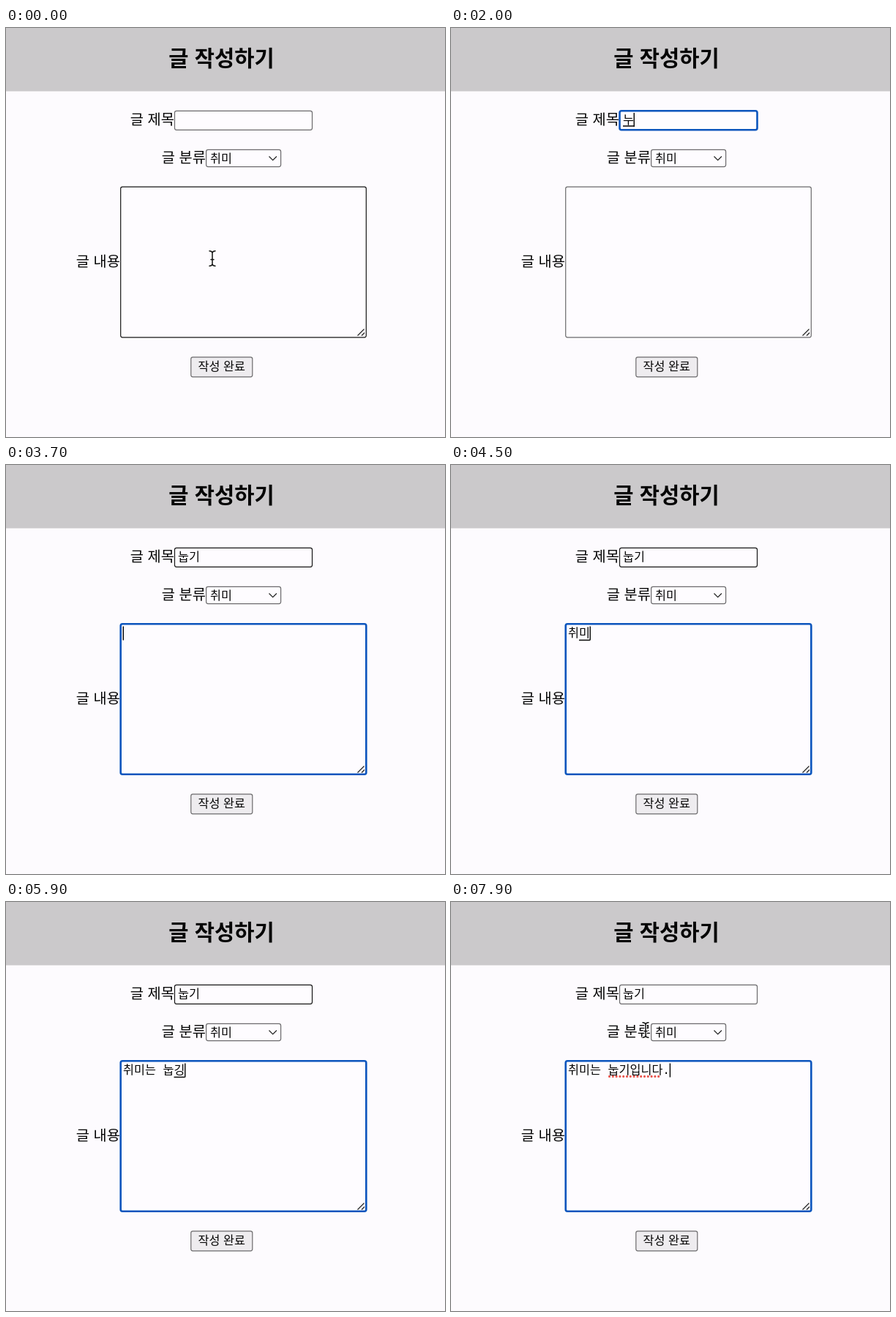
Recreate the animation shown at these times as an HTML page. Size 600 px wide and 559 px high, loop 8000 ms.

```html
<!DOCTYPE html>
<html lang="ko">
<head>
<meta charset="utf-8">
<title>글 작성하기</title>
<style>
  html, body { margin: 0; width: 100%; height: 100%; overflow: hidden; background: #fdfbfe; }
  svg { display: block; width: 600px; height: 559px; }
  text { font-family: "Noto Sans CJK KR", "Noto Sans CJK", sans-serif; font-size: 16.25px; fill: #050505; white-space: pre; }
  .heading { font-size: 29.6px; font-weight: 700; }
  .label { font-size: 19.8px; }
  .mono { font-family: "Liberation Mono", "Noto Sans CJK KR", "Noto Sans CJK", monospace; }
  .box { fill: #fefcff; stroke: #6b6a6c; stroke-width: 1.2; }
  .box.hover { stroke: #161616; }
  .box.focus { stroke: #0c55bd; stroke-width: 2.6; }
  .line { fill: none; stroke: #222; stroke-width: 1.2; }
  .caret { stroke: #000; stroke-width: 1.4; }
  .compose { stroke: #111; stroke-width: 1.6; }
  .typo { stroke: #e9564e; stroke-width: 3.2; stroke-linecap: round; stroke-dasharray: 0 4.8; }
</style>
</head>
<body>
<svg viewBox="0 0 600 559">
  <rect width="600" height="86.5" fill="#cbc9cb"/>
  <text class="heading" x="294.5" y="51.6" text-anchor="middle">글 작성하기</text>

  <text class="label" x="230" y="132" text-anchor="end">글 제목</text>
  <rect id="title" class="box" x="230.5" y="113.3" width="188" height="26" rx="2.5"/>

  <text class="label" x="273" y="184" text-anchor="end">글 분류</text>
  <rect id="kind" class="box" x="273.6" y="166.4" width="102" height="23.2" rx="2.5"/>
  <text x="279" y="183.6">취미</text>
  <path class="line" d="M359.5 175.5l5.2 5.2 5.2-5.2" stroke-width="1.5"/>

  <text class="label" x="156" y="325.5" text-anchor="end">글 내용</text>
  <rect id="body" class="box" x="156.7" y="217.2" width="335.6" height="205.6" rx="2.5"/>
  <path class="line" d="M480.5 420.5l9-9M486 420.5l4-4"/>

  <rect class="box" x="252.8" y="449.8" width="84" height="27" rx="2.5" style="fill:#eeecef"/>
  <text x="294.8" y="467.6" text-anchor="middle">작성 완료</text>

  <path id="typo" class="typo" d="M216.5 238.4H288.5"/>
  <text id="titleText" x="235" y="130.8"></text>
  <text id="bodyText" class="mono" x="160" y="235.2"></text>
  <path id="compose" class="compose"/>
  <path id="caret" class="caret"/>

  <g id="pointer" fill="none" stroke-linecap="round">
    <path id="halo" stroke="#fff" stroke-width="3.4"/>
    <path id="beam" stroke="#111" stroke-width="1.5"/>
  </g>
</svg>
<script>
const $ = id => document.getElementById(id);
const LOOP = 8000;

// [time, committed text, syllable being composed]
const titleSteps = [
  [0, '', ''], [1800, '', 'ㄴ'], [2000, '', '누'], [2200, '', '눕'],
  [2500, '눕', 'ㄱ'], [2700, '눕', '기'], [3100, '눕기', '']
];
const bodySteps = [
  [0, '', ''], [4000, '', 'ㅊ'], [4100, '', '추'], [4200, '', '취'],
  [4400, '', '췸'], [4500, '취', '미'], [4600, '취', '민'],
  [4700, '취미', '느'], [4800, '취미', '는'], [5000, '취미는 ', ''],
  [5200, '취미는 ', 'ㄴ'], [5400, '취미는 ', '누'], [5500, '취미는 ', '눕'],
  [5600, '취미는 눕', 'ㄱ'], [5700, '취미는 눕', '기'], [5900, '취미는 눕', '깅'],
  [6000, '취미는 눕기', '이'], [6100, '취미는 눕기', '입'],
  [6300, '취미는 눕기입', 'ㄴ'], [6400, '취미는 눕기입', '니'],
  [6500, '취미는 눕기입니', 'ㄷ'], [6600, '취미는 눕기입니', '다'],
  [6800, '취미는 눕기입니다.', '']
];
const focusSteps = [[0, ''], [1000, 'title'], [3300, 'kind'], [3600, 'body']];
const hoverSteps = [[0, 'body'], [400, ''], [600, 'title'], [7800, '']];
const caretSteps = [[0, false], [1100, true], [1500, false], [1800, true],
  [3300, false], [3600, true], [7300, false], [7800, true]];

const fields = {
  title: { x: 235, top: 116, line: 134, text: $('titleText'), steps: titleSteps },
  body: { x: 160, top: 220.5, line: 239.4, text: $('bodyText'), steps: bodySteps }
};

const beamPath = 'M-4-10.2Q-.6-10.2 0-7.6Q.6-10.2 4-10.2M0-7.6V7.6' +
  'M-4 10.2Q-.6 10.2 0 7.6Q.6 10.2 4 10.2M-2 1.5H2';
$('halo').setAttribute('d', beamPath);
$('beam').setAttribute('d', beamPath);

const at = (steps, t) => steps.findLast(s => s[0] <= t);
const show = (id, on) => $(id).setAttribute('visibility', on ? 'visible' : 'hidden');
const width = s => [...s].reduce((w, c) => w + (c === ' ' || c === '.' ? 9.75 : 14.95), 0);

function pointerAt(t) {
  if (t >= 1800 && t < 7800) return null;
  if (t >= 7800) return [266, t < 7900 ? 156 : 175];
  const p = Math.min(t / 600, 1);
  const e = p * p * (3 - 2 * p);
  return [282 - 16 * e, 315 - 183 * e];
}

function draw(t) {
  const focus = at(focusSteps, t)[1];
  const hover = at(hoverSteps, t)[1];
  for (const id of ['title', 'kind', 'body']) {
    $(id).setAttribute('class', 'box' + (id === focus ? ' focus' : id === hover ? ' hover' : ''));
  }

  let composing = false;
  for (const [id, f] of Object.entries(fields)) {
    const [, done, part] = at(f.steps, t);
    f.text.textContent = done + part;
    if (id !== focus) continue;
    const start = f.x + width(done);
    const end = start + width(part);
    composing = part !== '';
    $('compose').setAttribute('d', `M${start} ${f.line}H${end}`);
    $('caret').setAttribute('d', `M${end + .3} ${f.top}v19`);
  }
  show('compose', composing);
  show('caret', at(caretSteps, t)[1]);
  show('typo', t >= 7000);

  const pos = pointerAt(t);
  show('pointer', pos);
  if (pos) $('pointer').setAttribute('transform', `translate(${pos})`);
}

const begin = performance.now();
function tick() {
  const t = (performance.now() - begin) % LOOP;
  draw(Math.floor(t / 100) * 100);
  requestAnimationFrame(tick);
}
tick();
</script>
</body>
</html>
```
